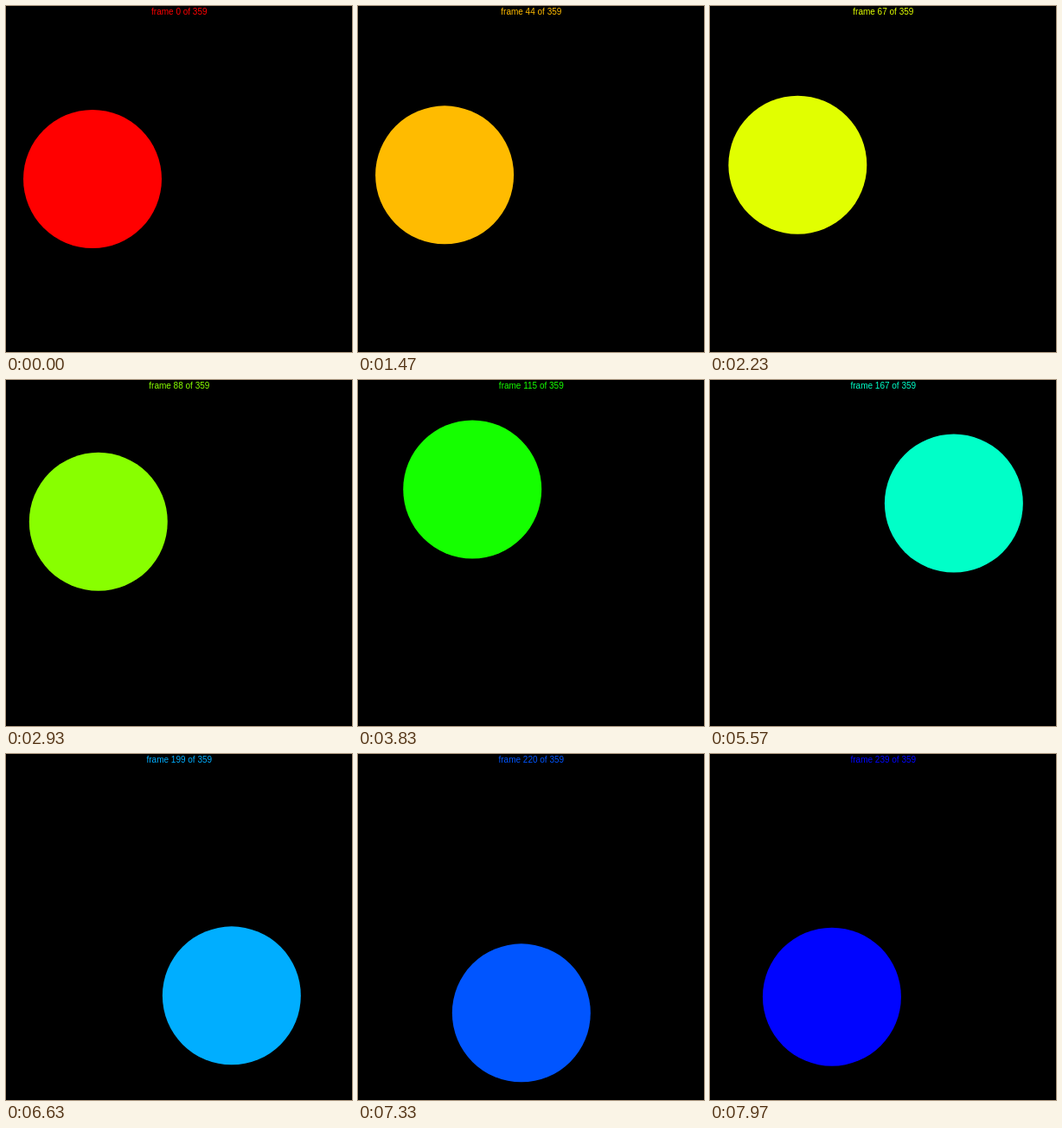
Write an HTML page with a canvas that moves like this. It is 400 px wide and 400 px high and loops after 8 s.

```html
<!DOCTYPE html>
<html lang="en">
<head>
<meta charset="utf-8">
<title>Orbiting disc</title>
<style>
  html, body { margin: 0; width: 100%; height: 100%; overflow: hidden; background: #000; }
  canvas { display: block; }
</style>
</head>
<body>
<canvas id="stage" width="400" height="400"></canvas>
<script>
const LOOP_MS = 8000;
const LAST_STEP = 359;
const CENTER = 200;
const ORBIT = 100;
const RADIUS = 80;

const ctx = document.getElementById('stage').getContext('2d');
ctx.font = '10px "Liberation Sans", Arial, sans-serif';
ctx.textAlign = 'center';

const easeInOutCubic = u => u < 0.5 ? 4 * u ** 3 : 1 - 4 * (1 - u) ** 3;

// 30 steps per second, with step times rounded to 10 ms
const stepAt = ms => Math.floor((Math.floor(ms / 10) * 3 + 1) / 10);

function draw(step) {
  const angle = Math.PI + 2 * Math.PI * easeInOutCubic(step / LAST_STEP);
  ctx.fillStyle = '#000';
  ctx.fillRect(0, 0, 400, 400);

  ctx.fillStyle = `hsl(${step}, 100%, 50%)`;
  ctx.beginPath();
  ctx.arc(CENTER + ORBIT * Math.cos(angle), CENTER + ORBIT * Math.sin(angle), RADIUS, 0, 2 * Math.PI);
  ctx.fill();
  ctx.fillText(`frame ${step} of ${LAST_STEP}`, CENTER + 0.3, 10);
}

let start;
function tick(now) {
  start ??= now;
  draw(stepAt((now - start) % LOOP_MS));
  requestAnimationFrame(tick);
}
draw(0);
requestAnimationFrame(tick);
</script>
</body>
</html>
```
